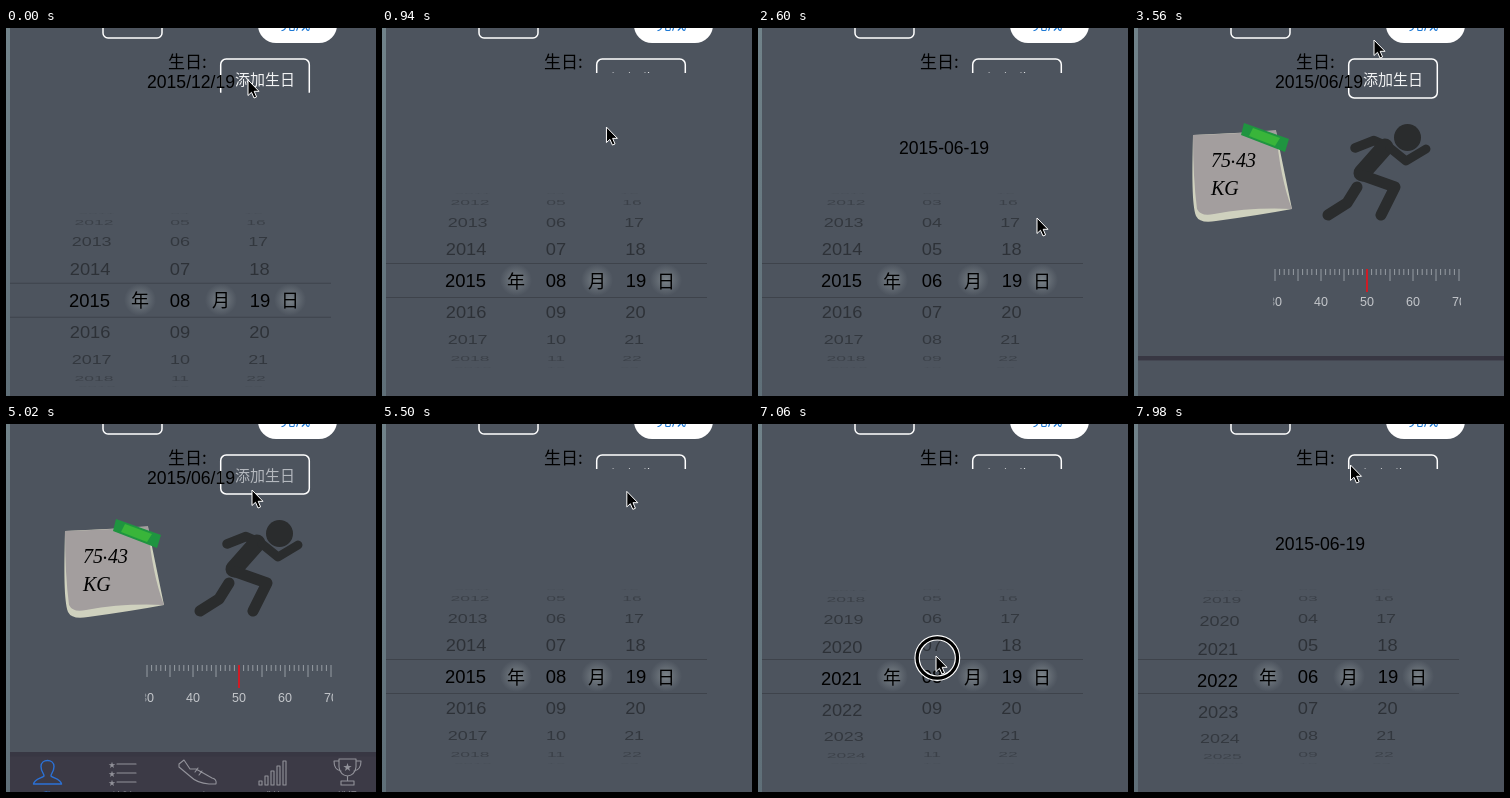
An HTML page that plays this animation: 370x368 px, repeating every 8 s.

```html
<!DOCTYPE html>
<html lang="zh-CN">
<head>
<meta charset="utf-8">
<title>生日选择器</title>
<style>
  html, body { margin: 0; width: 100%; height: 100%; overflow: hidden; background: #4d545e; }
  svg { display: block; width: 370px; height: 368px; }
  text { font-family: "Liberation Sans", "Noto Sans CJK SC", "Noto Sans CJK", sans-serif; }
  .cjk { font-family: "Noto Sans CJK SC", "Noto Sans CJK", sans-serif; }
  .mid { text-anchor: middle; }
  .date { font-size: 17.6px; }
  .wheel { font-size: 18.4px; text-anchor: middle; }
  .note { font: italic 20px "Liberation Serif", serif; }
  .line { fill: none; stroke-linecap: round; stroke-linejoin: round; }
  .frame { fill: none; stroke: #fff; stroke-width: 1.5; }
</style>
</head>
<body>
<svg viewBox="0 0 370 368">
  <defs>
    <linearGradient id="edge" x2="0" y2="1">
      <stop offset="0" stop-color="#71838a"/><stop offset="1" stop-color="#5f6f78"/>
    </linearGradient>
    <radialGradient id="glow">
      <stop offset="0" stop-color="#b4bdbd" stop-opacity=".45"/>
      <stop offset=".5" stop-color="#a9b2b4" stop-opacity=".24"/>
      <stop offset="1" stop-color="#a0aab0" stop-opacity="0"/>
    </radialGradient>
    <clipPath id="inBand"><rect x="4" y="236" width="322" height="33"/></clipPath>
    <clipPath id="offBand"><path d="M4 160H326V236H4ZM4 269H326V346H4Z"/></clipPath>
    <clipPath id="rulerBox"><rect x="139.5" y="236" width="187.5" height="50"/></clipPath>
  </defs>

  <rect width="370" height="368" fill="#4d545e"/>
  <rect width="4" height="368" fill="url(#edge)"/>

  <rect class="frame" x="97" y="-20" width="59" height="30" rx="5"/>
  <rect x="252" y="-21" width="79" height="36" rx="18" fill="#fff"/>
  <text class="cjk mid" x="289.5" y="0.5" font-size="15" fill="#1c78d4">完成</text>
  <text class="cjk" x="162" y="39.5" font-size="17">生日:</text>
  <rect class="frame" x="214.7" y="31" width="88.6" height="39" rx="5.5"/>
  <text id="add" class="cjk mid" x="259" y="56.5" font-size="15"></text>
  <text id="saved" class="date" x="141" y="60"></text>

  <!-- note -->
  <path fill="#cfd1be" d="M59 107C58 148 58 176 62 188Q66 196 82 193Q126 187 158 181L142 103Z"/>
  <path fill="#a39e9e" d="M59 107Q102 106 142 102Q146 150 158 181Q118 179 80 186Q67 189 63 181Q59 150 59 107Z"/>
  <path fill="#1f9440" d="M110 95L155 111L151 124L107 107Z"/>
  <path fill="#39b53a" d="M119 100L146 110L141 118L115 108Z"/>
  <text class="note" x="77" y="139">75<tspan dy="-4">.</tspan><tspan dy="4">43</tspan></text>
  <text class="note" x="77" y="167">KG</text>

  <!-- runner -->
  <g class="line" stroke="#2a2c2d" stroke-width="11">
    <circle cx="273.5" cy="109.5" r="13.5" fill="#2a2c2d" stroke="none"/>
    <path stroke-width="9.500" d="M248 116L240 112.500L221 120"/>
    <path stroke-width="17" d="M251 119L228 145"/>
    <path stroke-width="9" d="M256 120L272 133L292 121"/>
    <path d="M230 148L261 159L247 187"/>
    <path d="M223 159L213 175L194 187"/>
  </g>

  <g id="ruler" clip-path="url(#rulerBox)"></g>

  <!-- tab bar -->
  <rect x="4" y="328" width="366" height="40" fill="#3c3a46"/>
  <rect x="4" y="328" width="366" height="4.500" fill="#383743"/>
  <g id="tabs" class="line" stroke="#92929a" stroke-width="1.1">
    <path stroke="#2b72d8" stroke-width="1.4" d="M27.500 360C28 355 36 354 38 352C38.500 350 35 348 35 342.500C35 334.500 48 334.500 48 342.500C48 348 44.500 350 45 352C47 354 55 355 55.500 360Z"/>
    <path d="M173 340L178 336L184 345L190 345L206 354Q211 355 210 360L203 360Q191 359 185 353L173 343ZM189 348L192 344M193 351L196 347"/>
    <path d="M333 335H350V343Q349 351 341.500 352Q334 351 333 343ZM333 337H328Q328 346 335 347M350 337H355Q355 346 348 347M341.500 352V357M335 361V357H348V361Z"/>
  </g>

  <g id="panel">
    <rect x="4" y="45" width="366" height="420" fill="#4d545e"/>
    <text id="picked" class="date" x="141" y="126">2015-06-19</text>
    <path stroke="#3e434b" d="M4 235.500H325M4 269.500H325"/>
    <g id="units"></g>
    <g id="dim" clip-path="url(#offBand)"></g>
    <g id="lit" clip-path="url(#inBand)"></g>
  </g>

  <g id="cursor">
    <g id="ring" fill="none">
      <circle cx="1.300" cy="2" r="20.200" stroke="#fff" stroke-width="5.500"/>
      <circle cx="1.300" cy="2" r="20.200" stroke="#000" stroke-width="3.200"/>
    </g>
    <path d="M0 0V15.500L3.500 12.300L6 18L8.600 16.900L6.200 11.300H11Z" stroke="#fff"/>
  </g>
</svg>

<script>
const LOOP = 8000;
const SVG = "http://www.w3.org/2000/svg";
const $ = id => document.getElementById(id);
const clamp = x => Math.min(1, Math.max(0, x));
const smooth = x => (x = clamp(x)) * x * (3 - 2 * x);
const between = (t, [a, b]) => t >= a && t < b;

function add(parent, tag, attrs, text = "") {
  const el = document.createElementNS(SVG, tag);
  for (const k in attrs) el.setAttribute(k, attrs[k]);
  el.textContent = text;
  parent.append(el);
  return el;
}

// Pointer moves: from, to, x, y
const moves = [
  [660, 1460, 180, 218], [1640, 2040, 177, 284],
  [2260, 2600, 279, 190], [2600, 2940, 240, 12],
  [3860, 4240, 155, 96], [4240, 4800, 246, 56], [4960, 5020, 246, 66],
  [5480, 5900, 83, 258], [5920, 6100, 100, 205], [6100, 6160, 103, 195],
  [6320, 7000, 178, 232], [7060, 7460, 178, 302],
  [7520, 7720, 276, 200], [7720, 7980, 216.5, 41]
];
function pointer(t) {
  let x = 242, y = 52;
  for (const [from, to, toX, toY] of moves) {
    const u = smooth((t - from) / (to - from));
    x += (toX - x) * u;
    y += (toY - y) * u;
  }
  return [x, y];
}

const press = {
  month: [1500, 2260], dismiss: [3290, 3400], open: [4840, 4960],
  year: [5900, 6100], monthAgain: [7020, 7520]
};

// Rows scrolled by a drag: the pointer slips a little before the wheel follows.
const ROW = 32, SLIP = 17;
function dragged([down, up], t) {
  const dy = pointer(Math.min(t, up))[1] - pointer(down)[1];
  return -Math.sign(dy) * Math.max(0, Math.abs(dy) - SLIP) / ROW;
}

const CLOSE = 3398, OPEN = 5030, TRAVEL = 360, SLIDE = 494;

function monthAt(t) {
  const hold = t < OPEN ? press.month : press.monthAgain;
  const v = 8 + (t < hold[0] ? 0 : dragged(hold, t));
  return v + (Math.round(v) - v) * smooth((t - hold[1]) / 160);
}

function yearAt(t) {
  const [down, up] = press.year;
  if (t < down) return 2015;
  if (t < up) return 2015 + dragged(press.year, t);
  return 2022.13 - 6.02 * Math.exp(-1.69 * (t - up) / 1000);
}

const left = u => TRAVEL * (1 - clamp(u / SLIDE)) ** 4;
function panelY(t) {
  if (t < CLOSE) return left(t + 254);
  return t < OPEN ? TRAVEL - left(t - CLOSE) : left(t - OPEN);
}

// Ruler: one tick per unit, 50 under the needle
for (let n = 30; n <= 70; n++) {
  const x = 233 + (n - 50) * 4.6;
  add($("ruler"), "path", { d: `M${x} 241v${n % 5 ? 6 : 12}`, stroke: "#959ba2" });
  if (n % 10 === 0)
    add($("ruler"), "text", { x, y: 278, class: "mid", "font-size": 12.5, fill: "#c3c6ca" }, n);
}
add($("ruler"), "path", { d: "M233 241V264", stroke: "#cf1c25", "stroke-width": 2 });

// Tab icons made of repeats, and the cut-off labels
const star = (x, y, size) =>
  add($("tabs"), "text", { x, y, class: "mid", "font-size": size, fill: "#92929a", stroke: "none" }, "★");
for (let i = 0; i < 3; i++) {
  add($("tabs"), "path", { d: `M111 ${340 + 9 * i}h19` });
  star(106, 342.5 + 9 * i, 7);
}
star(341.5, 346, 9);
for (let i = 0; i < 5; i++) {
  const h = 4 + 5 * i;
  add($("tabs"), "rect", { x: 253 + 6 * i, y: 361 - h, width: 3, height: h });
}
["我", "计划", "运动", "成绩", "排行"].forEach((name, i) =>
  add($("tabs"), "text", { x: 41 + 75 * i, y: 375.5, class: "cjk mid", "font-size": 10,
    stroke: "none", fill: i ? "#92929a" : "#2b72d8" }, name));

for (const [x, name] of [[134, "年"], [215, "月"], [284, "日"]]) {
  add($("units"), "circle", { cx: x, cy: 252, r: 16, fill: "url(#glow)" });
  add($("units"), "text", { x, y: 259.5, class: "cjk mid", "font-size": 18 }, name);
}

// Picker wheels
const STEP = 21.2 * Math.PI / 180, RADIUS = 87, MIDDLE = 252.5, VANISH = 174;
const wrap = (n, size) => String((n - 1 + size) % size + 1).padStart(2, "0");
const wheels = [
  { x: 83.5, value: yearAt, label: String },
  { x: 174, value: monthAt, label: n => wrap(n, 12) },
  { x: 254, value: () => 19, label: n => wrap(n, 31) }
];
for (const w of wheels) {
  w.slots = [];
  for (let k = -5; k <= 5; k++)
    w.slots.push({ k, els: [$("dim"), $("lit")].map(g => add(g, "text", { y: 6.6, class: "wheel" })) });
}

function drawWheel(w, t) {
  const v = w.value(t), base = Math.round(v);
  for (const { k, els } of w.slots) {
    const n = base + k, angle = (n - v) * STEP, c = Math.cos(angle);
    const shown = Math.abs(angle) < 1.53;
    const s = 1 - 0.09 * (1 - c);
    const x = VANISH + (w.x - VANISH) * s, y = MIDDLE + RADIUS * Math.sin(angle);
    els.forEach((el, i) => {
      el.style.display = shown ? "" : "none";
      if (!shown) return;
      const label = w.label(n);
      if (el.textContent !== label) el.textContent = label;
      el.setAttribute("transform", `translate(${x} ${y}) scale(${s} ${s * c})`);
      el.setAttribute("opacity", i ? 1 : 0.43 * c ** 0.8);
    });
  }
}

function draw(t) {
  $("panel").setAttribute("transform", `translate(0 ${panelY(t)})`);
  for (const w of wheels) drawWheel(w, t);
  $("picked").style.display = between(t, [2440, 4000]) || t >= 7680 ? "" : "none";
  $("saved").textContent = t < press.dismiss[0] ? "2015/12/19" : "2015/06/19";
  $("add").textContent = "添加生日";
  $("add").setAttribute("fill", between(t, [4860, 5100]) ? "#b4b8be" : "#f2f3f4");
  $("cursor").setAttribute("transform", `translate(${pointer(t)})`);
  $("ring").style.display = Object.values(press).some(p => between(t, p)) ? "" : "none";
}

const start = performance.now();
function tick() {
  draw((performance.now() - start) % LOOP);
  requestAnimationFrame(tick);
}
tick();
</script>
</body>
</html>
```
